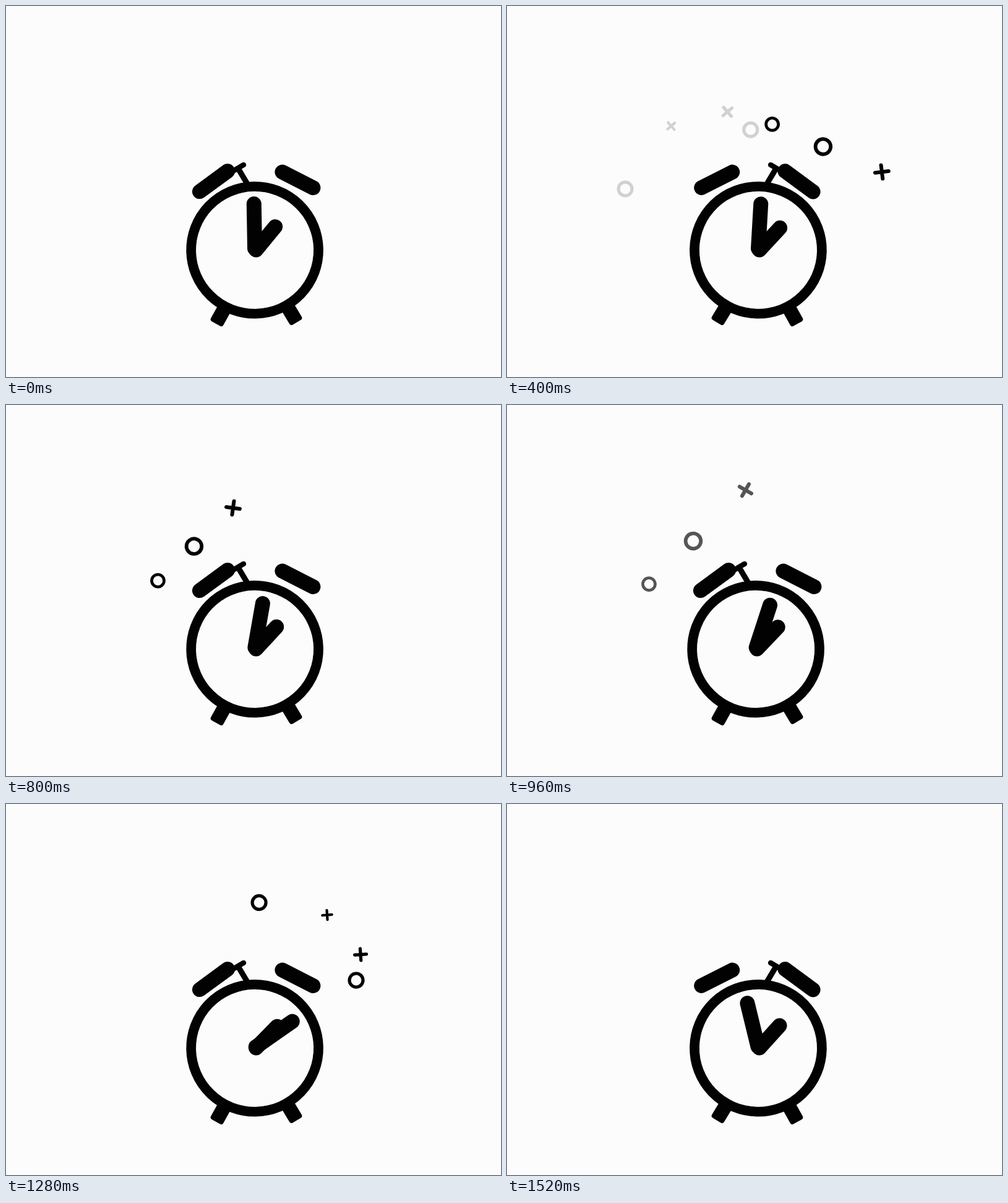
These frames come from a looping animation (800x600 px, 1560 ms). An HTML page with a canvas:

```html
<!DOCTYPE html>
<html lang="en">
<head>
<meta charset="utf-8">
<title>Ringing alarm clock</title>
<style>
  html, body { margin: 0; height: 100%; overflow: hidden; background: #fcfcfc; }
  canvas { display: block; }
</style>
</head>
<body>
<canvas id="stage" width="800" height="600"></canvas>
<script>
const ctx = document.getElementById('stage').getContext('2d');
const PAPER = '#fcfcfc', INK = '#020202';
const STEP = 40, STEPS = 39, LIFE = 11, FADE_FROM = 5;
const rad = deg => deg * Math.PI / 180;

// Each spark: shape, size, start x, y, end x, y
const bursts = [
  { born: 0, spin: -6, power: 3, sparks: [
    ['cross', 7.7, 315, 256, 265.3, 194.1], ['cross', 9.5, 342, 249, 356.3, 171.1],
    ['ring', 11, 353, 258, 393.8, 200], ['ring', 11, 292.5, 287, 191, 295.8]] },
  { born: 6, spin: -29, power: 4, sparks: [
    ['ring', 10, 466, 235, 421.3, 182.6], ['ring', 12.3, 490.6, 248.5, 514.8, 223.3],
    ['cross', 11, 498, 250, 627, 272]] },
  { born: 17, spin: -8.5, power: 4, sparks: [
    ['ring', 10, 289.4, 269, 228.4, 290], ['ring', 12.3, 312, 252, 300.8, 219.4],
    ['cross', 11, 316, 246, 386.7, 135.6]] },
  { born: 27, spin: -31.5, power: 3, sparks: [
    ['ring', 11, 450.7, 241, 401, 143.6], ['cross', 7.7, 488, 248, 525, 166.2],
    ['cross', 9.5, 506, 269.6, 586, 238.4], ['ring', 11, 504, 283.7, 578, 285.3]] }
];

const minuteKeys = [[33, 62], [34, 66], [35, 50], [36, 22], [37, -6], [38, -14.7], [39, 0]];
const hourKeys = [[0, 0], [6, .5], [14, 2], [24, 4], [33, 5], [38, .4], [39, 0]];

function track(keys, f) {
  const i = Math.max(1, keys.findIndex(k => k[0] >= f));
  const [f0, v0] = keys[i - 1], [f1, v1] = keys[i];
  return v0 + (v1 - v0) * (f - f0) / (f1 - f0);
}

const minuteAngle = f => f < 33 ? .86 * (Math.exp(.131 * f) - 1) : track(minuteKeys, f);

function placed(x, y, deg, draw) {
  ctx.save();
  ctx.translate(x, y);
  ctx.rotate(rad(deg));
  draw();
  ctx.restore();
}

function line(x1, y1, x2, y2, width) {
  ctx.lineWidth = width;
  ctx.beginPath();
  ctx.moveTo(x1, y1);
  ctx.lineTo(x2, y2);
  ctx.stroke();
}

function circle(r, width) {
  ctx.lineWidth = width;
  ctx.beginPath();
  ctx.arc(0, 0, r, 0, 7);
  ctx.stroke();
}

function drawBurst({ born, spin, power, sparks }, f) {
  const age = f - born;
  if (age <= 0 || age >= LIFE) return;
  const e = 1 - (1 - age / LIFE) ** power;
  ctx.globalAlpha = Math.min(1, 1 - (age - FADE_FROM) / (LIFE - FADE_FROM));
  for (const [shape, size, x0, y0, x1, y1] of sparks) {
    const s = size * Math.min(1, age / 2);
    placed(x0 + (x1 - x0) * e, y0 + (y1 - y0) * e, spin + 5.5 * age, () => {
      if (shape === 'ring') return circle(s, s * .47);
      ctx.beginPath();
      ctx.lineWidth = s * .55;
      ctx.moveTo(-s, 0); ctx.lineTo(s, 0);
      ctx.moveTo(0, -s); ctx.lineTo(0, s);
      ctx.stroke();
    });
  }
  ctx.globalAlpha = 1;
}

function foot(x, deg) {
  placed(x, 512.7, deg, () => {
    ctx.beginPath();
    ctx.roundRect(-11.5, -40, 23, 40, 4);
    ctx.fill();
  });
}

// lean runs from -1 (hammer on the left bell) to 1 (on the right bell)
function drawClock(f, lean) {
  placed(405, 313, 30.7 * lean, () => {
    line(0, 0, 0, -58, 9);
    line(-10.5, -59, 10.5, -59, 8.5);
  });
  const bell = () => line(-28, 0, 28, 0, 24);
  placed(337.4 + 1.85 * lean, 282.4 - 1.15 * lean, -31.5 + 4.7 * lean, bell);
  placed(471.7 + .3 * lean, 282.5 + 1.25 * lean, 31.7 + 4.7 * lean, bell);

  placed(404, 505, lean, () => {
    ctx.translate(-404, -505);
    foot(339.2, 30);
    foot(469.8, -30);
    placed(404, 394.75, 0, () => {
      circle(102.7, 16.2);
      ctx.fillStyle = PAPER;
      ctx.beginPath();
      ctx.arc(0, 0, 95, 0, 7);
      ctx.fill();
    });
    placed(404, 394, minuteAngle(f), () => line(0, -2, 0, -74, 24));
    placed(406, 394.5, 40.6 + track(hourKeys, f), () => line(0, 0, 0, -48.7, 24));
  });
}

function frame() {
  const f = Math.floor(performance.now() / STEP) % STEPS;
  ctx.fillStyle = PAPER;
  ctx.fillRect(0, 0, 800, 600);
  ctx.fillStyle = ctx.strokeStyle = INK;
  ctx.lineCap = 'round';
  bursts.forEach(b => drawBurst(b, f));
  drawClock(f, -Math.cos(f * Math.PI / 2));
  requestAnimationFrame(frame);
}
frame();
</script>
</body>
</html>
```
